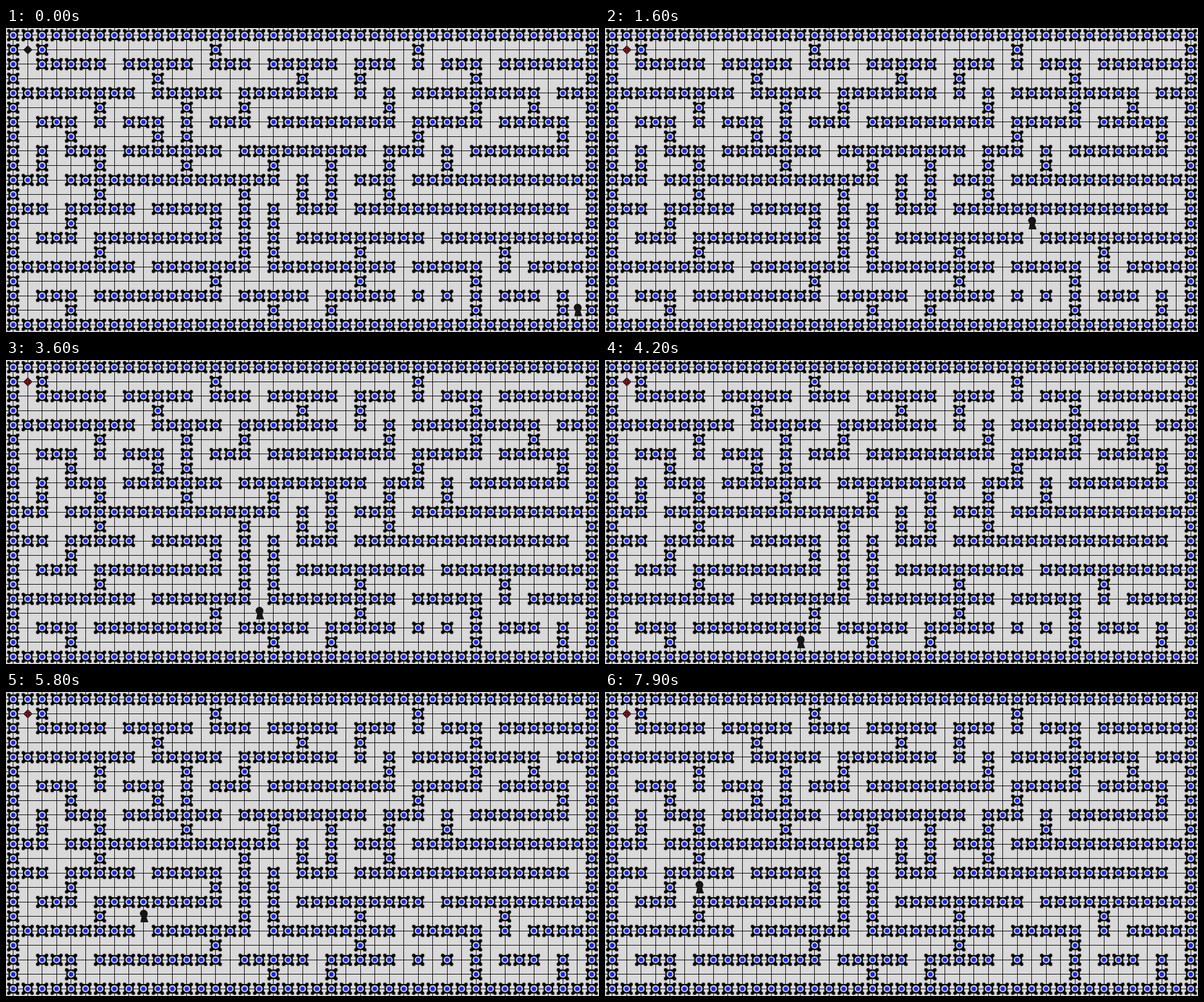
An HTML page with a canvas that plays this animation: 1046 px wide and 536 px high, repeating every 8000 ms.

```html
<!DOCTYPE html>
<html lang="en">
<head>
<meta charset="utf-8">
<title>Maze walk</title>
<style>
html, body { margin: 0; width: 100%; height: 100%; overflow: hidden; background: #d9d9d9; }
canvas { display: block; }
</style>
</head>
<body>
<canvas id="stage" width="1046" height="536"></canvas>
<script>
const W = 1046, H = 536, COLS = 41, ROWS = 21;
const STEP_MS = 100, STEPS = 80;
const ctx = document.getElementById('stage').getContext('2d');
const centreX = col => (col + 0.5) * W / COLS;
const centreY = row => (row + 0.5) * H / ROWS;

// Inner walls from row 1 down; posts on even rows and columns are implied.
const wallRuns = [
  '2 14 28',
  '2-6 8-12 14-16 18-22 24-26 30-32 34-40',
  '10 20 24 32',
  '0-8 10-14 16-22 28-36 38-40',
  '6 12 16 26 32 36',
  '2-4 8-10 14-16 18-26 28-32 34-38',
  '4 10 12 28 38',
  '4-6 8-14 16-24 26-28 32-38',
  '2 6 12 18 22 26 30',
  '0-2 4-18 24-26 28-40',
  '6 16 20 22 26',
  '0-2 4-8 10-14 20-22 24-38',
  '4 14 16 18',
  '2-4 6-14 20-28 30-40',
  '6 16 18 24 34',
  '0-8 10-16 18-26 28-32 36-40',
  '14 24 32',
  '2-4 6-14 16-20 22-26 34-36',
  '4 18 22 32 38'
];

const route = 'U2 L6 U2 L4 U2 L10 U2 L2 D6 L2 D2 L10 U2 R4 U2 R6 U4 L6 D2 L3';
const moves = { U: [0, -1], D: [0, 1], L: [-1, 0], R: [1, 0] };

function isWall(col, row) {
  if (col % (COLS - 1) === 0 || row % (ROWS - 1) === 0) return true;
  if (col % 2 === 0 && row % 2 === 0) return true;
  return wallRuns[row - 1].split(' ').some(run => {
    const [from, to = from] = run.split('-').map(Number);
    return col >= from && col <= to;
  });
}

function walk() {
  let col = 39, row = 19;
  const cells = [[col, row]];
  for (const leg of route.split(' ')) {
    const [dx, dy] = moves[leg[0]];
    for (let n = Number(leg.slice(1)); n > 0; n--) {
      cells.push([col += dx, row += dy]);
    }
  }
  return cells;
}

function disc(g, x, y, r, colour) {
  g.fillStyle = colour;
  g.beginPath();
  g.arc(x, y, r, 0, Math.PI * 2);
  g.fill();
}

function drawWall(g, x, y) {
  g.save();
  g.translate(x, y);
  g.shadowColor = 'rgba(0,0,0,0.55)';
  g.shadowBlur = 2;
  for (const sx of [-1, 1]) {
    for (const sy of [-1, 1]) disc(g, sx * 7.8, sy * 7.8, 2.9, '#060606');
  }
  g.fillStyle = '#060606';
  g.beginPath();
  g.roundRect(-8.2, -8.2, 16.4, 16.4, 3);
  g.fill();
  g.shadowColor = 'transparent';
  disc(g, 0, 0, 6.2, '#c9cdc9');
  disc(g, 0, 0, 4.2, '#8f9cf0');
  disc(g, 0, 0, 3.6, '#1522f2');
  g.restore();
}

function makeMaze() {
  const layer = document.createElement('canvas');
  layer.width = W;
  layer.height = H;
  const g = layer.getContext('2d');
  g.fillStyle = '#d9d9d9';
  g.fillRect(0, 0, W, H);
  g.fillStyle = '#000';
  for (let c = 0; c < COLS; c++) g.fillRect(Math.floor(centreX(c)), 0, 1, H);
  for (let r = 0; r < ROWS; r++) g.fillRect(0, Math.floor(centreY(r)), W, 1);
  for (let r = 0; r < ROWS; r++) {
    for (let c = 0; c < COLS; c++) {
      if (isWall(c, r)) drawWall(g, centreX(c), centreY(r));
    }
  }
  return layer;
}

function diamond(x, y, r, colour) {
  ctx.fillStyle = colour;
  ctx.beginPath();
  ctx.moveTo(x, y - r);
  ctx.lineTo(x + r, y);
  ctx.lineTo(x, y + r);
  ctx.lineTo(x - r, y);
  ctx.fill();
}

function drawGoal(lit) {
  const x = Math.floor(centreX(1)) + 0.5, y = Math.floor(centreY(1)) + 0.5;
  diamond(x, y, 8, '#161414');
  if (!lit) return;
  diamond(x, y, 6, '#a3151b');
  ctx.fillStyle = '#2a0c0c';
  for (const d of [-2.5, 1.5]) {
    ctx.fillRect(x + d, y - 3.5, 1, 7);
    ctx.fillRect(x - 3.5, y + d, 7, 1);
  }
}

function drawWalker([col, row]) {
  ctx.save();
  ctx.translate(centreX(col) + 0.7, centreY(row));
  ctx.fillStyle = '#141414';
  ctx.beginPath();
  ctx.moveTo(-7, -4);
  ctx.bezierCurveTo(-7, -14, 7, -14, 7, -4);
  ctx.lineTo(5, 2);
  ctx.lineTo(8, 10.5);
  ctx.lineTo(-6, 10.5);
  ctx.lineTo(-4, 1);
  ctx.closePath();
  ctx.fill();
  ctx.restore();
}

const maze = makeMaze();
const cells = walk();

function render(now) {
  const step = Math.floor(now / STEP_MS) % STEPS;
  ctx.drawImage(maze, 0, 0);
  drawGoal(step > 0);
  drawWalker(cells[step]);
  requestAnimationFrame(render);
}
render(0);
</script>
</body>
</html>
```
